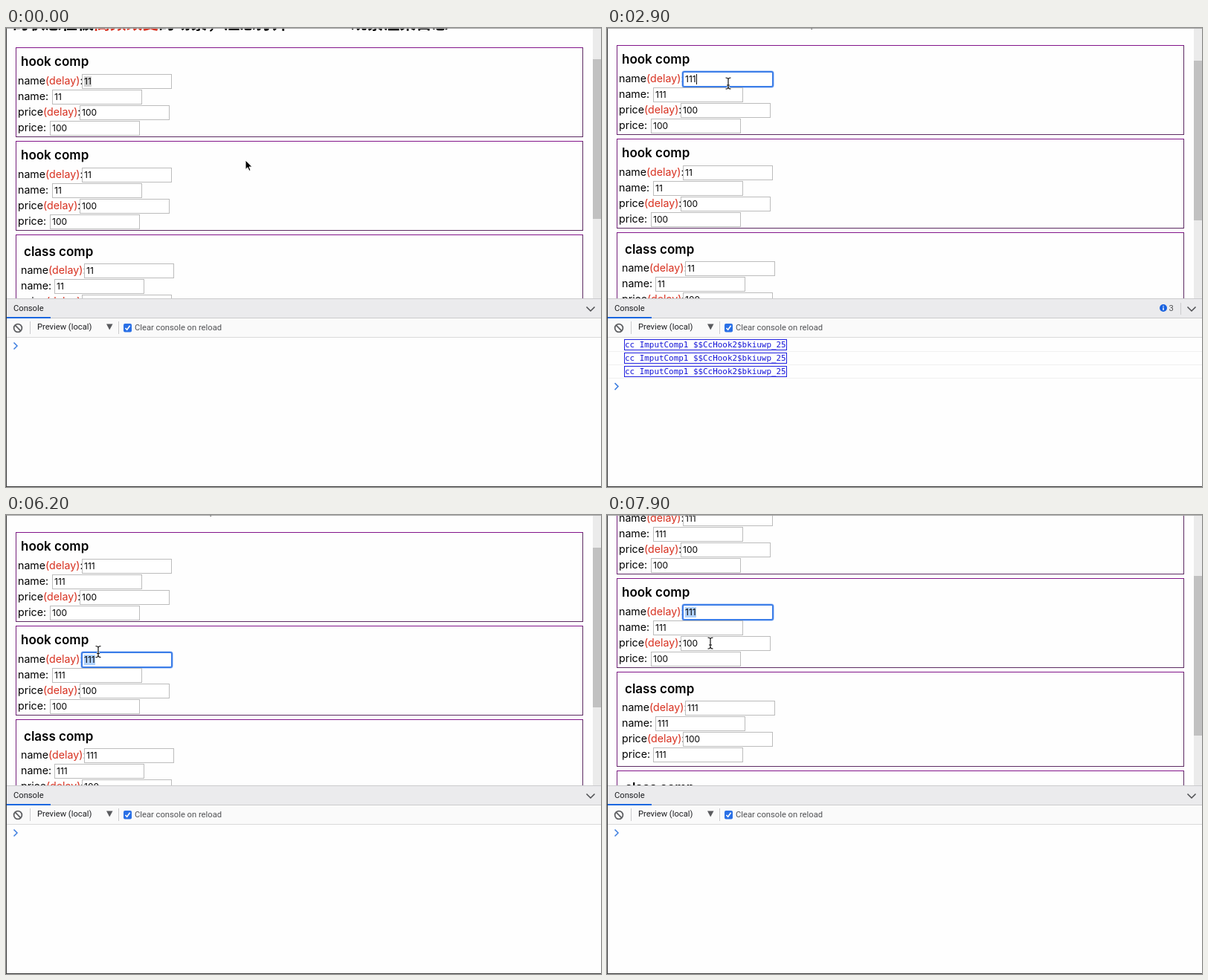
Animation of 800 by 618 pixels, one loop 8000 ms. Source, as an HTML page:

```html
<!DOCTYPE html>
<html lang="zh-CN">
<head>
<meta charset="utf-8">
<title>Delayed input demo</title>
<style>
  html, body { margin: 0; width: 100%; height: 100%; overflow: hidden; background: #fff; }
  #stage { position: relative; width: 800px; height: 618px; overflow: hidden; background: #fefefe; }
  #stage * { position: absolute; box-sizing: border-box; white-space: pre; }
  #stage i { position: static; font-style: normal; color: #d8301f; }
  #view { left: 0; top: 0; width: 800px; height: 364px; overflow: hidden; }
  #page { left: 0; top: 0; color: #000; font-family: Inter, "Noto Sans CJK SC", "Noto Sans CJK", sans-serif; }
  .title { left: 9px; top: -49px; font: 700 21.8px/30px Inter, "Noto Sans CJK SC", "Noto Sans CJK", sans-serif; }
  .box { left: 13px; width: 763px; border: 1px solid; border-color: #82148a #5c2a62 #5c2a62 #74207a; }
  .head { font-size: 17px; font-weight: 600; line-height: 20px; }
  .label { font-size: 14.2px; line-height: 20px; }
  .input { width: 121px; height: 20px; border: 1px solid #bcbcbc; background: #fff; font-size: 12px; line-height: 18px; }
  .input span { left: 2px; top: 2px; height: 14px; line-height: 14px; }
  .focus { border-color: #3b7de8; border-radius: 2px; box-shadow: 0 0 0 1px #3b7de8, 0 0 1px 1.5px #8fb6f4; }
  .picked span { background: #d4d4d4; }
  .focus.picked span { background: #b0d2fc; }
  .caret span { box-shadow: 1px 0 #111; }
  #track { left: 789px; top: 0; width: 11px; height: 364px; background: #ebebeb; }
  #thumb { width: 11px; height: 215px; background: #c1c1c1; }
  #panel { left: 0; top: 364px; width: 800px; height: 254px; background: #fefefe; color: #1c1d20; font: 11.2px/16px Roboto, sans-serif; }
  #tabs { left: 0; top: 0; width: 800px; height: 27px; background: #ebebed; border: solid #cbcbcd; border-width: 1px 0; }
  #bar { left: 0; top: 27px; width: 800px; height: 26px; background: #fafafa; border-bottom: 1px solid #d9d9d9; }
  #logs { left: 0; top: 0; }
  .log { left: 0; width: 800px; height: 19px; border-bottom: 1px solid #f0f0f0; }
  .log span { left: 23px; top: 2px; height: 15px; border: 1px solid #2020e0; font: 10.92px/13px "DejaVu Sans Mono", monospace; color: #1414d8; }
  #art, #cursor { left: 0; top: 0; }
  #frame { inset: 0; border: solid #3a3a3a; border-width: 1px; border-top-color: #a8a8a8; border-right: 0; }
</style>
</head>
<body>
<div id="stage">
  <div id="view">
    <div id="page"><div class="title">的状态在被<i>高频改变</i>的场景，注意打开console观察渲染日志</div></div>
    <div id="track"><div id="thumb"></div></div>
  </div>
  <div id="panel">
    <div id="tabs"></div>
    <div id="bar"></div>
    <span style="left:10px;top:6px">Console</span>
    <span style="left:42px;top:31px">Preview (local)</span>
    <span style="left:173px;top:32px;color:#505154">Clear console on reload</span>
    <div id="logs"></div>
  </div>
  <svg id="art" width="800" height="618" fill="none">
    <path d="M1 390H60" stroke="#1a67e0" stroke-width="2"/>
    <path d="M32.5 395V412M151.5 395V412" stroke="#cbcbcd"/>
    <g id="clear" stroke="#5f6063" stroke-width="1.8"><circle cx="16" cy="404" r="5.4"/><path d="M12.2 400.2L19.8 407.8"/></g>
    <path d="M135 398.5H143.5L139.2 406.5Z" fill="#5a5b5e"/>
    <rect x="158" y="398" width="11" height="11.5" rx="2" fill="#2a70e6"/>
    <path d="M160.5 404L162.7 406.3L166.6 400.8" stroke="#fff" stroke-width="1.6"/>
    <path d="M780.5 375.5L786 381L791.5 375.5" stroke="#4a4b4e" stroke-width="1.5"/>
    <path id="prompt" d="M10.5 423.5L15 428L10.5 432.5" stroke="#3f7fe0" stroke-width="1.5"/>
    <g id="badge">
      <circle cx="748" cy="377" r="5" fill="#1a62e0"/>
      <path d="M748 374V375.3M748 376.3V380" stroke="#fff" stroke-width="1.4"/>
      <path d="M771.5 370V386" stroke="#cbcbcd"/>
      <text id="count" x="755.5" y="381" fill="#505154" font-size="11.2" font-family="Roboto, sans-serif"></text>
    </g>
  </svg>
  <div id="frame"></div>
  <svg id="cursor" width="24" height="24" overflow="visible" fill="none">
    <path id="arrow" d="M0 0V12.5L2.9 9.8L4.9 14.4L7 13.5L5 9H9Z" fill="#000" stroke="#fff" stroke-width="1"/>
    <g id="beam">
      <path d="M-3.5 -7.5Q0 -7.5 0 -5Q0 -7.5 3.5 -7.5M0 -5V5M-3.5 7.5Q0 7.5 0 5Q0 7.5 3.5 7.5M-2 2.5H2" stroke="#fff" stroke-width="2.6"/>
      <path d="M-3.5 -7.5Q0 -7.5 0 -5Q0 -7.5 3.5 -7.5M0 -5V5M-3.5 7.5Q0 7.5 0 5Q0 7.5 3.5 7.5M-2 2.5H2" stroke="#111" stroke-width="1.2"/>
    </g>
  </svg>
</div>
<script>
const LOOP = 8000, STEP = 100;
const $ = id => document.getElementById(id);

function add(parent, cls, style, html = '') {
  const el = document.createElement('div');
  el.className = cls;
  for (const k in style) el.style[k] = style[k] + 'px';
  el.innerHTML = html;
  parent.append(el);
  return el;
}

// One form box with its four rows; returns the input elements.
function makeBox(kind, top) {
  const pad = kind === 'class' ? 4 : 0, inset = pad && 3;
  add($('page'), 'box', { top: top - 1, height: pad ? 128 : 121 });
  add($('page'), 'head', { left: 20 + pad, top: top + 8 + pad }, kind + ' comp');
  const rows = [['name<i>(delay)</i>:', 102], ['name:', 62], ['price<i>(delay)</i>:', 99], ['price:', 59]];
  return rows.map(([label, x], i) => {
    const y = top + 35 + inset + i * 21;
    add($('page'), 'label', { left: 16 + pad, top: y - 1 }, label);
    return add($('page'), 'input', { left: x + inset, top: y }, '<span>100</span>');
  });
}

const boxes = [['hook', 0], ['hook', 126], ['class', 252], ['class', 385]].map(b => makeBox(...b));

const own = 'cc ImputComp1 $$CcHook2$bkiuwp_25';
const lines = [own, own, own, 'cc ImputComp1 $$CcHook2$bkiuwp_26', 'cc ImputComp2 $$CcClass1$bkiuwp_27', 'cc ImputComp2 $$CcClass1$bkiuwp_28'];
const logs = lines.map((s, i) => {
  const row = add($('logs'), 'log', { top: Math.round(52.6 + i * 18.2) });
  const text = document.createElement('span');
  text.textContent = s;
  row.append(text);
  return row;
});

// Keys are [time, ...values], eased between neighbours.
function track(keys, t) {
  const i = keys.findIndex(k => k[0] > t);
  if (i < 0) return keys[keys.length - 1].slice(1);
  if (i === 0) return keys[0].slice(1);
  const a = keys[i - 1], b = keys[i];
  const p = (t - a[0]) / (b[0] - a[0]), e = p * p * (3 - 2 * p);
  return a.slice(1).map((v, n) => v + (b[n + 1] - v) * e);
}

const scroll = [[0, 27], [100, 27], [900, 24], [6200, 24], [6800, -44], [7300, -44], [7900, -40]];
const pointer = [
  [0, 322, 178], [900, 215, 118], [1400, 137, 72.5], [1500, 137, 72.5], [2200, 163, 74.5],
  [3800, 163, 74.5], [4300, 110, 508], [4800, 20, 401], [5100, 20, 401], [5500, 58, 376],
  [5600, 58, 376], [6100, 124, 184], [6200, 124, 184], [6500, 139, 172.5]
];
const typed = [2500, 2600, 2800], synced = 3400, cleared = 4900;

const setText = (input, s) => { input.firstChild.textContent = s; };
const show = (el, on) => { el.style.display = on ? '' : 'none'; };

function render(t) {
  const [y] = track(scroll, t);
  $('page').style.transform = `translateY(${Math.round(y)}px)`;
  $('thumb').style.top = 42 + Math.round((27 - y) * 0.59) + 'px';

  const keys = typed.filter(k => t >= k).length;
  const first = keys ? '1'.repeat(keys) : '11';
  boxes.forEach((inputs, i) => {
    const name = i === 0 ? first : t >= synced ? '111' : '11';
    setText(inputs[0], name);
    setText(inputs[1], name);
    if (i > 1) setText(inputs[3], name);
  });

  const a = boxes[0][0].classList, b = boxes[1][0].classList;
  a.toggle('focus', t >= 1200 && t < cleared);
  a.toggle('picked', t < typed[0]);
  a.toggle('caret', keys > 0 && t < cleared && (t - 2800) % 1000 < 500);
  b.toggle('focus', t >= 6100);
  b.toggle('picked', t >= 6100);

  const n = t >= cleared ? 0 : t >= synced ? 6 : keys;
  logs.forEach((row, i) => show(row, i < n));
  $('prompt').setAttribute('transform', `translate(0 ${n * 18.2})`);
  show($('badge'), n > 0);
  $('count').textContent = n;

  const [px, py] = track(pointer, t);
  $('cursor').style.transform = `translate(${px}px, ${py}px)`;
  const beam = t >= 1200 && t < 4000 || t >= 6000;
  show($('beam'), beam);
  show($('arrow'), !beam);
  $('clear').setAttribute('stroke', Math.hypot(px - 16, py - 404) < 12 ? '#1c1d20' : '#5f6063');
}

const start = performance.now();
function tick() {
  const t = (performance.now() - start) % LOOP;
  render(Math.floor(t / STEP) * STEP);
  requestAnimationFrame(tick);
}
tick();
</script>
</body>
</html>
```
